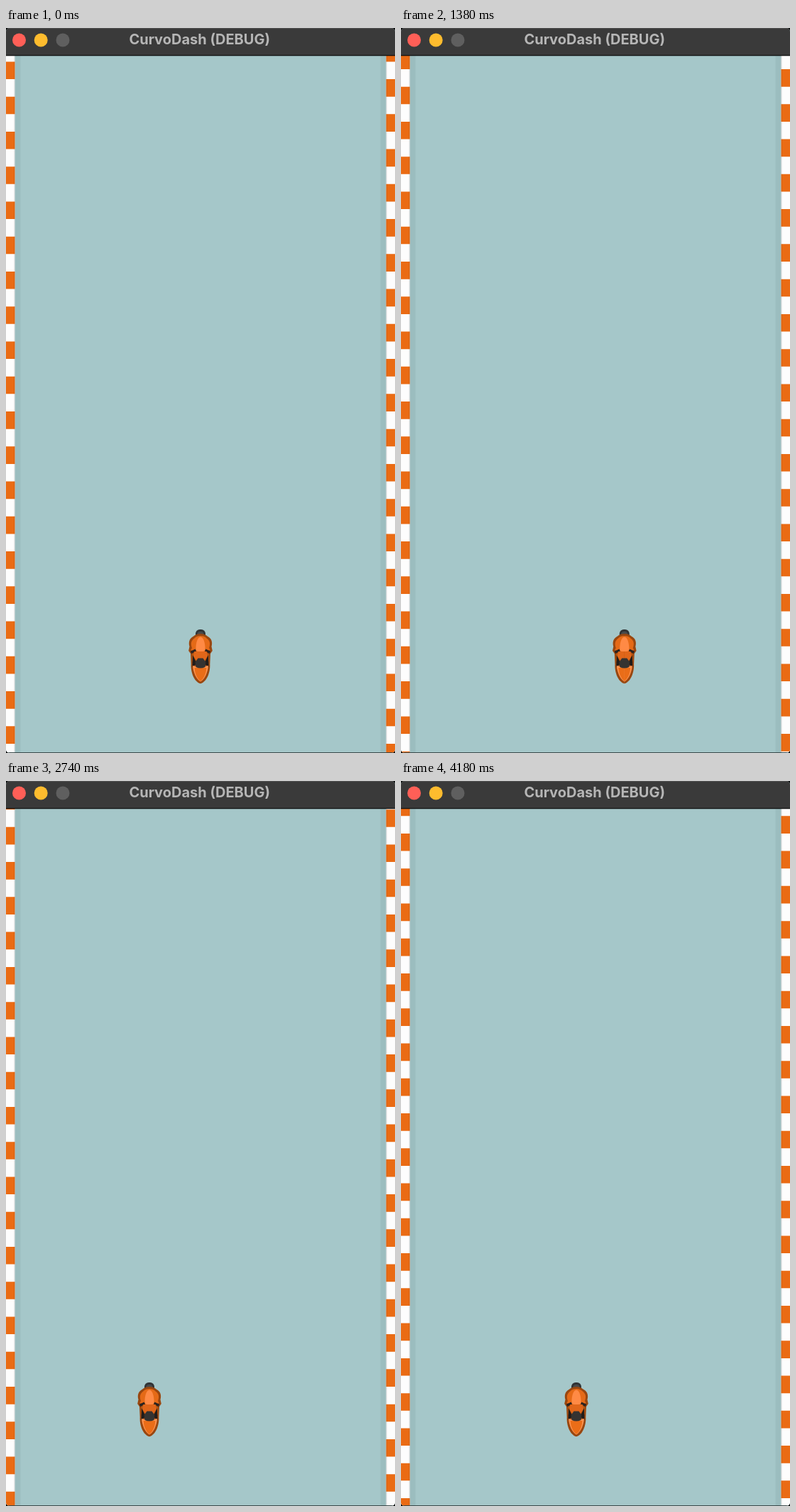
Recreate the animation shown at these times as an HTML page. Size 548 px wide and 1021 px high, loop 4.21 s.

```html
<!DOCTYPE html>
<html lang="en">
<head>
<meta charset="utf-8">
<title>CurvoDash</title>
<style>
  html, body { margin: 0; width: 100%; height: 100%; overflow: hidden; background: #000; }
  svg { display: block; width: 100vw; height: 100vh; }
  .title { font: 700 20px Inter, "Open Sans", sans-serif; fill: #b6b6b6; text-anchor: middle; }
  .kerb { stroke: #ea6b14; stroke-width: 12.5; stroke-dasharray: 24.63; }
</style>
</head>
<body>
<svg viewBox="0 0 548 1021">
  <defs>
    <clipPath id="window"><rect width="548" height="1021" rx="5"/></clipPath>
    <!-- right half of the bike, mirrored for the left -->
    <g id="half">
      <path fill="#994710" d="M0 853C6 853 9 856 12 858C16 861 17 866 15.5 871L16.8 877L14 881L13.3 896C14 907 9 921 0 923.3Z"/>
      <path fill="#e56a17" d="M0 856C6 856 8 859 10.5 861C13.5 864 13.8 868 12 873L13.5 876L8 880L0 880Z"/>
      <path fill="#2b2320" d="M7 874.5L14 877.5L13 881L6 878Z"/>
      <path fill="#b9560f" d="M0 878H8L12 882V892H0Z"/>
      <path fill="#211c1a" d="M11 883L11.5 900L5 895Z"/>
      <path fill="#e0661a" d="M0 878H8.5L10 884L6 891H0Z"/>
      <path fill="#ff9450" d="M0 902L6 899L11 898C10 908 6 917 0 920.5Z"/>
      <path fill="#ea6d18" d="M0 901H8.5C8 909 5 916 0 920Z"/>
    </g>
  </defs>
  <g clip-path="url(#window)">
    <rect width="548" height="1021" fill="#a5c7c9"/>
    <path fill="#9bbdbf" d="M12 39h8.5v982H12zM527.5 39h8.5v982h-8.5z"/>
    <path fill="#fdfdfd" d="M0 39h12.5v982H0zM535.5 39H548v982h-12.5z"/>
    <path class="kerb" id="left" d="M6.25 39V1021"/>
    <path class="kerb" id="right" d="M541.75 39V1021"/>
    <path fill="#000" opacity=".08" d="M11 39h1.5v982H11zM535.5 39H537v982h-1.5z"/>

    <g id="bike">
      <rect x="-7" y="847" width="14" height="16" rx="6" fill="#303335"/>
      <rect x="-4.5" y="850" width="9" height="10" rx="4" fill="#484a4b"/>
      <use href="#half"/>
      <use href="#half" transform="scale(-1 1)"/>
      <path fill="#ff8a45" d="M0 857.5C4 857.5 7 866 6.5 876Q6 878 3 878H-3Q-6 878-6.5 876C-7 866-4 857.5 0 857.5Z"/>
      <path fill="#353331" d="M-3.5 887.5H3.5L7.5 893L6.5 900Q0 903-6.5 900L-7.5 893Z"/>
    </g>

    <rect width="548" height="39" fill="#3a3a3a"/>
    <rect width="548" height="1" fill="#505050"/>
    <rect y="38" width="548" height="1.3" fill="#101010"/>
    <rect y="1020" width="548" height="1" fill="#3c4a4b"/>
    <circle cx="18.5" cy="17" r="9.5" fill="#ff5f57"/>
    <circle cx="49.2" cy="17" r="9.5" fill="#febc2e"/>
    <circle cx="80" cy="17" r="9.5" fill="#5f5f5f"/>
    <text class="title" x="272.7" y="23">CurvoDash (DEBUG)</text>
  </g>
</svg>
<script>
  const LOOP = 4210, TICK = 20, LAST = 4180, STRIPE = 24.63;

  // [ms, px] points joined by straight lines
  const steering = [[0, 274], [160, 274], [420, 233.5], [636, 200], [1060, 265.5], [1690, 362.5],
    [1700, 361.3], [2740, 202], [3130, 142], [3300, 167.5], [3998, 275], [4180, 247]];
  const scrolling = [[0, 0], [420, 161.5], [1060, 401.3], [1700, 654.5],
    [2740, 1051.9], [3300, 1269.6], [4180, 1602.9]];

  const [left, right, bike] = ['left', 'right', 'bike'].map(id => document.getElementById(id));

  function valueAt(points, t) {
    const i = Math.max(1, points.findIndex(p => p[0] >= t));
    const [t0, v0] = points[i - 1], [t1, v1] = points[i];
    return v0 + (v1 - v0) * (t - t0) / (t1 - t0);
  }

  function draw(now) {
    const t = Math.min(LAST, Math.floor((now % LOOP) / TICK) * TICK);
    const offset = 8.4 + valueAt(scrolling, t);
    left.style.strokeDashoffset = -offset;
    right.style.strokeDashoffset = -offset - STRIPE;
    bike.setAttribute('transform', `translate(${valueAt(steering, t)} 0)`);
    requestAnimationFrame(draw);
  }
  draw(0);
</script>
</body>
</html>
```
